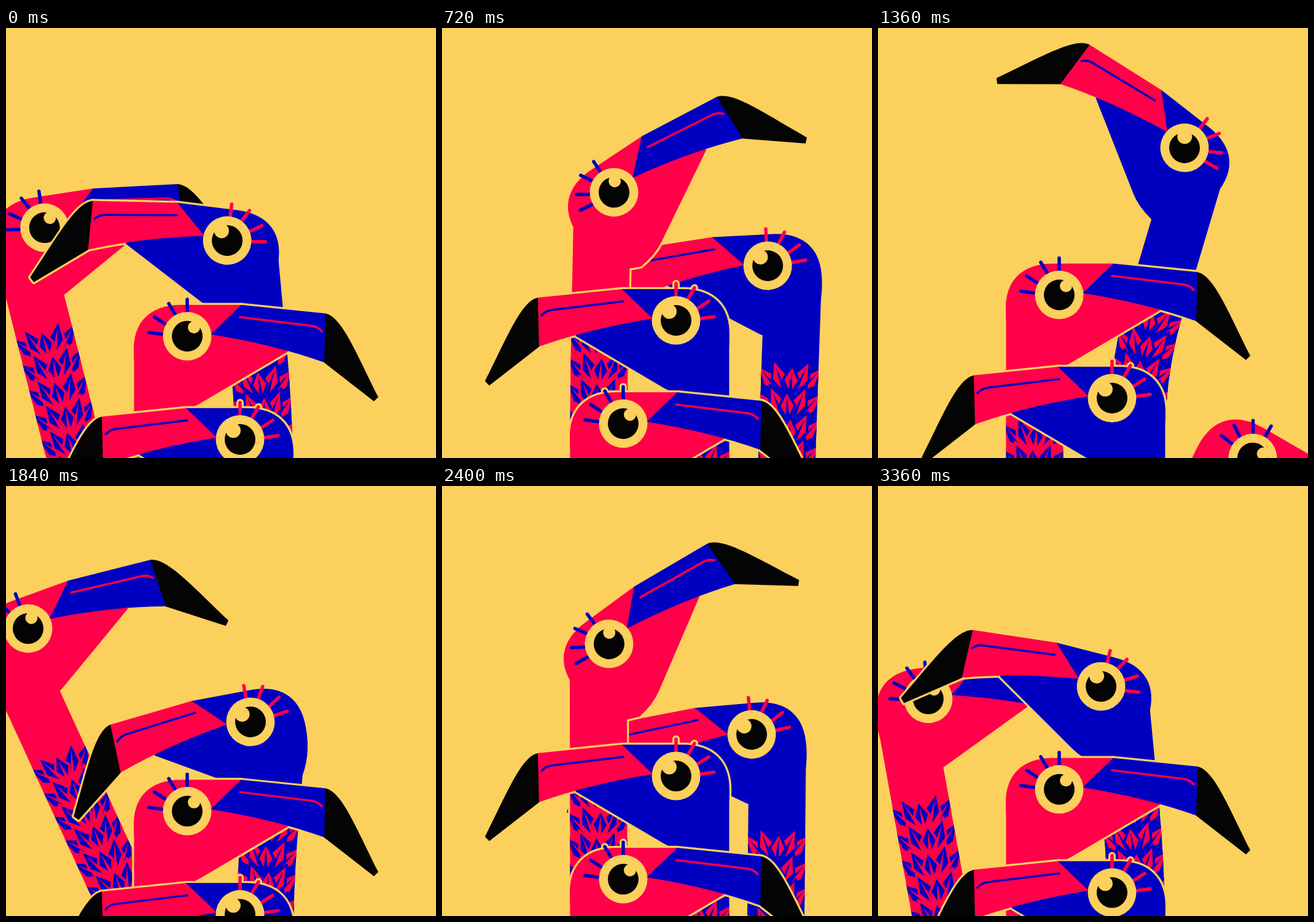
An HTML page with a canvas that plays this animation: 700x700 px, repeating every 3.4 s.

```html
<!DOCTYPE html>
<html lang="en">
<head>
<meta charset="utf-8">
<title>Bird stack</title>
<style>
  html, body { margin: 0; width: 100%; height: 100%; overflow: hidden; background: #fcd05c; }
  canvas { display: block; width: 700px; height: 700px; }
</style>
</head>
<body>
<canvas id="stage" width="700" height="700"></canvas>
<script>
const ctx = document.getElementById('stage').getContext('2d');
const RED = '#ff0049', BLUE = '#0000c0', YELLOW = '#fcd05c', BLACK = '#040404';
const LOOP = 3400, STEP = 40, PERIOD = 1700, GAP = PERIOD / 2;
const SINK = 168 / GAP;              // downward speed of the stack, px per ms
const FIRST_AGE = 440;
const BASE_X = 421, MIRROR = 676, NECK = 46.5;
const PIVOT_X = 40, PIVOT_Y = 25;    // top of the neck, relative to the eye

// Swing of the head: it rises, arcs over, drops and settles on the stack
const SWING = [
  { age: 510, x: 66, y: 700, tilt: -30 },
  { age: 710, x: 518, y: 395, tilt: -4 },
  { age: 830, x: 604, y: 337, tilt: 7 },
  { age: 990, x: 640, y: 232, tilt: 20 },
  { age: 1180, x: 589, y: 179, tilt: 31.5 },
  { age: 1360, x: 499, y: 195, tilt: 38 },
  { age: 1560, x: 400, y: 262, tilt: 35 },
  { age: 1680, x: 360, y: 337, tilt: 10.5 },
  { age: 1840, x: 398, y: 384, tilt: -10.5 },
  { age: 2030, x: 381, y: 400, tilt: -2 },
  { age: 2210, x: 381, y: 434.5, tilt: 0 }
];
const REST = SWING[SWING.length - 1];

// Outlines relative to the eye, beak to the left
const HEAD = new Path2D('M-88-51L10-51C62-51 88-22 87 25Q87 76 60 112L30 125Q0 122-20 110L-164 25Z');
const BEAK = new Path2D('M-226-37L-88-51L-38-3Q-140 13-224 43Z');
const TIP = new Path2D('M-225-37C-252-32-276 30-311 99L-304 106L-223 43Z');
const LINE = new Path2D('M-86-31L-202-17Q-212-16-219-8');
const LASHES = new Path2D('M0-40V-60M20-36L30-53M36-20L53-31M39-3L62-6');

const clamp = (v, a, b) => Math.min(b, Math.max(a, v));

function slope(i, key) {
  const rate = j => (SWING[j + 1][key] - SWING[j][key]) / (SWING[j + 1].age - SWING[j].age);
  if (i === 0) return rate(0);
  if (SWING[i] === REST) return key === 'y' ? SINK : 0;
  const a = SWING[i].age - SWING[i - 1].age, b = SWING[i + 1].age - SWING[i].age;
  return (rate(i - 1) * b + rate(i) * a) / (a + b);
}

// Smooth curve through the swing, then a steady descent
function pose(age) {
  if (age >= REST.age) return { ...REST, y: REST.y + (age - REST.age) * SINK };
  let i = 0;
  while (SWING[i + 1].age <= age) i++;
  const from = SWING[i], to = SWING[i + 1];
  const d = to.age - from.age, s = (age - from.age) / d, q = 1 - s;
  const at = key =>
    q * q * (1 + 2 * s) * from[key] + s * q * q * d * slope(i, key) +
    s * s * (3 - 2 * s) * to[key] - s * s * q * d * slope(i + 1, key);
  return { x: at('x'), y: at('y'), tilt: at('tilt') };
}

// Centre line: straight from the head, rounded bend, then straight down
function neckLine({ x, y, tilt }, age) {
  const a = tilt * Math.PI / 180;
  const px = x + PIVOT_X * Math.cos(a) - PIVOT_Y * Math.sin(a);
  const py = y + PIVOT_X * Math.sin(a) + PIVOT_Y * Math.cos(a);
  const bend = 470 * (1 - Math.exp((690 - age) / 600));
  const drop = 1e5 / Math.max(bend, 1);
  const len = Math.hypot(BASE_X - px, drop);
  const dx = (BASE_X - px) / len, dy = drop / len;
  const r = Math.min(110, drop * 0.8), cy = py + drop;
  const line = [{ x: px, y: py, dx, dy }];
  for (let i = 0; i <= 12; i++) {
    const s = i / 12, q = 1 - s;
    const tx = q * dx, ty = q * dy + s, n = Math.hypot(tx, ty);
    line.push({ x: BASE_X - q * q * r * dx, y: cy - q * q * r * dy + s * s * r, dx: tx / n, dy: ty / n });
  }
  line.push({ x: BASE_X, y: cy + r + 900, dx: 0, dy: 1 });
  return line;
}

function neckShape(line) {
  const side = w => line.map(p => [p.x + p.dy * w, p.y - p.dx * w]);
  const path = new Path2D();
  side(NECK).concat(side(-NECK).reverse()).forEach(([x, y]) => path.lineTo(x, y));
  path.closePath();
  return path;
}

// Pointed leaf with a dark rib, growing up from the middle of the row
function leaf(tipX, tipY, body, accent) {
  const baseX = tipX * 0.2, baseY = 56;
  const len = Math.hypot(tipX - baseX, tipY - baseY);
  ctx.save();
  ctx.translate(baseX, baseY);
  ctx.rotate(Math.atan2(tipY - baseY, tipX - baseX));
  fill(new Path2D(`M0 0L${len * 0.5} -13L${len} 0L${len * 0.5} 13Z`), accent);
  line(new Path2D(`M0 0L${len * 0.5} -13L${len} 0L${len * 0.5} 13Z`), body, 4);
  fill(new Path2D(`M0 -4L${len * 0.8} 0L0 4Z`), body);
  ctx.restore();
}

function feathers(line, start, body, accent) {
  let next = start, walked = 0, flip = 1;
  for (let i = 1; i < line.length; i++) {
    const a = line[i - 1], b = line[i];
    const len = Math.hypot(b.x - a.x, b.y - a.y);
    for (; next <= walked + len; next += 42) {
      const s = (next - walked) / len, y = a.y + (b.y - a.y) * s;
      if (y > 760) return;
      ctx.save();
      ctx.translate(a.x + (b.x - a.x) * s, y);
      ctx.rotate(Math.atan2(b.y - a.y, b.x - a.x) - Math.PI / 2);
      ctx.scale(flip, 1);
      for (const x of [-54, 54, -28, 32, 4]) {
        leaf(x, 10 - 12 * Math.sin(Math.abs(x) / 18), body, accent);
      }
      ctx.restore();
      flip = -flip;
    }
    walked += len;
  }
}

function fill(path, color) {
  ctx.fillStyle = color;
  ctx.fill(path);
}

function line(path, color, width) {
  ctx.strokeStyle = color;
  ctx.lineWidth = width;
  ctx.stroke(path);
}

function dot(x, y, r, color) {
  ctx.beginPath();
  ctx.arc(x, y, r, 0, 7);
  ctx.fillStyle = color;
  ctx.fill();
}

function bird(age, isRed) {
  const head = pose(age);
  const body = isRed ? RED : BLUE, accent = isRed ? BLUE : RED;
  const spine = neckLine(head, age), neck = neckShape(spine);
  const stretch = clamp((age - 860) / 120, 0, 1) * clamp((1700 - age) / 140, 0, 1);
  const atHead = paint => {
    ctx.save();
    ctx.translate(head.x, head.y);
    ctx.rotate(head.tilt * Math.PI / 180);
    paint();
    ctx.restore();
  };

  ctx.save();
  if (isRed) {
    ctx.translate(MIRROR, 0);
    ctx.scale(-1, 1);
  }
  ctx.lineJoin = ctx.lineCap = 'round';

  line(neck, YELLOW, 6.5);
  atHead(() => {
    [HEAD, BEAK, TIP].forEach(p => line(p, YELLOW, 6.5));
    line(LASHES, YELLOW, 12);
  });

  fill(neck, body);
  ctx.save();
  ctx.clip(neck);
  feathers(spine, 132 + 45 * stretch, body, accent);
  ctx.restore();

  atHead(() => {
    fill(HEAD, body);
    fill(BEAK, accent);
    fill(TIP, BLACK);
    line(LINE, body, 3.5);
    line(LASHES, accent, 5.5);
    dot(0, 0, 39.5, YELLOW);
    dot(0, 0, 25, BLACK);
    dot(-11, -14.5, isRed ? 10 : 12, YELLOW);
  });
  ctx.restore();
}

function draw(time) {
  const phase = time % PERIOD;
  ctx.fillStyle = YELLOW;
  ctx.fillRect(0, 0, 700, 700);
  // newest bird at the back
  for (let i = -1; i < 5; i++) {
    const age = phase + i * GAP;
    if (age >= FIRST_AGE) bird(age, i % 2 !== 0);
  }
}

const began = performance.now();
function tick() {
  const time = (performance.now() - began) % LOOP;
  draw(Math.floor(time / STEP) * STEP);
  requestAnimationFrame(tick);
}
tick();
</script>
</body>
</html>
```
